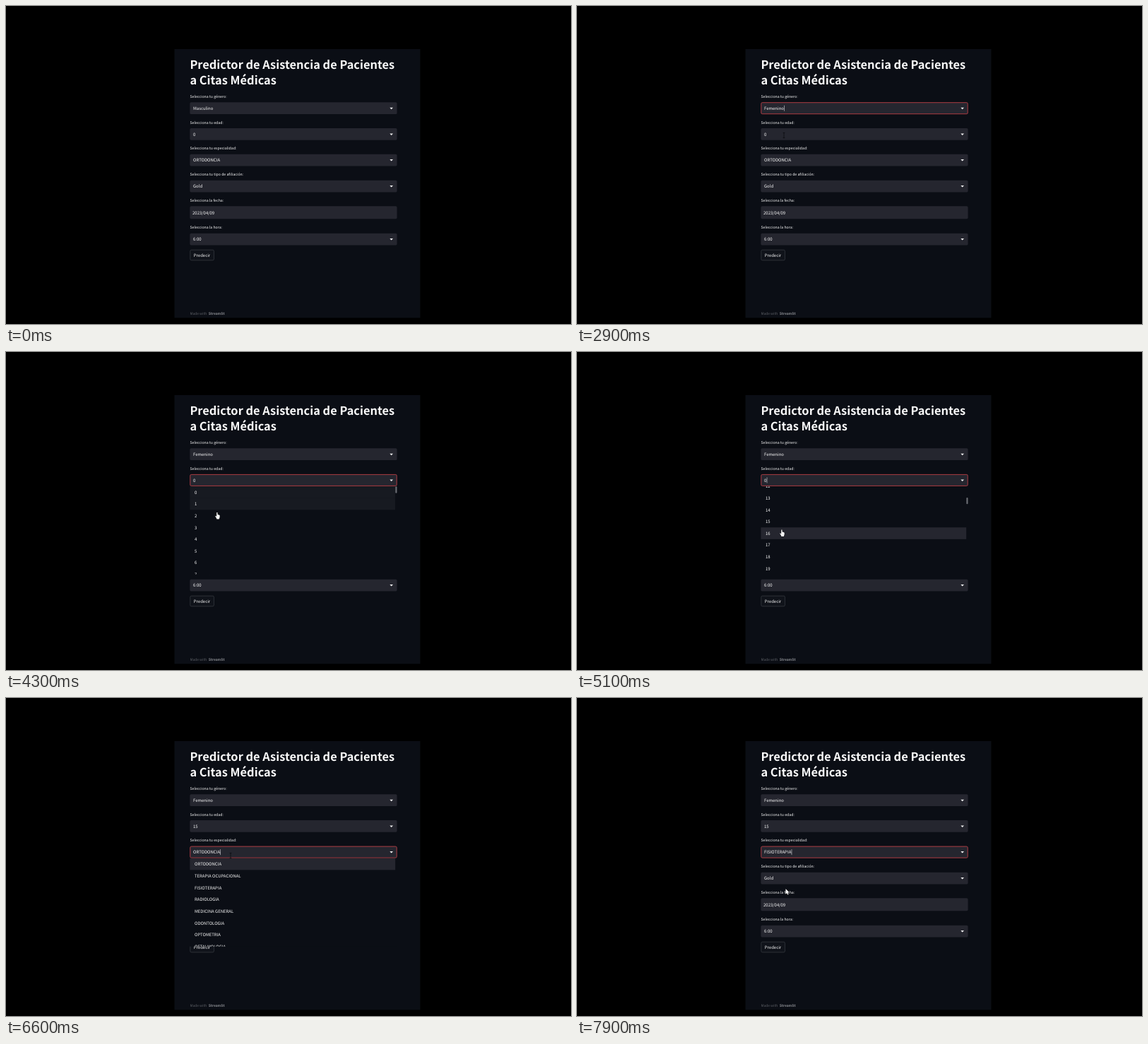
Animation, 800 px wide and 450 px high, one loop 8 s. Source, as an HTML page with a canvas:

```html
<!DOCTYPE html>
<html lang="es">
<head>
<meta charset="utf-8">
<title>Predictor de Asistencia</title>
<style>
html, body { margin: 0; width: 100%; height: 100%; overflow: hidden; background: #000; }
canvas { display: block; width: 800px; height: 450px; }
</style>
</head>
<body>
<canvas id="stage"></canvas>
<script>
const LOOP = 8000, STEP = 100;
const LEFT = 260.4, RIGHT = 553.6, ROW = 16.64;
const PANEL = '#0b0e15', FIELD = '#25262f', TEXT = '#fafafa', FOCUS = '#b93d43';
const FAMILY = '"Noto Sans CJK JP", "Noto Sans CJK SC", "Noto Sans CJK KR", "Noto Sans CJK", "Noto Sans", sans-serif';

const canvas = document.getElementById('stage');
const ctx = canvas.getContext('2d');
const dpr = window.devicePixelRatio || 1;
canvas.width = 800 * dpr;
canvas.height = 450 * dpr;

const ages = Array.from({ length: 100 }, (_, i) => String(i));
const specialties = ['ORTODONCIA', 'TERAPIA OCUPACIONAL', 'FISIOTERAPIA', 'RADIOLOGIA',
  'MEDICINA GENERAL', 'ODONTOLOGIA', 'OPTOMETRIA', 'OFTALMOLOGIA'];

const lists = [
  { items: ['Masculino', 'Femenino'], top: 153, bottom: 186.4, open: 1700, close: 2400 },
  { items: ages, top: 190, bottom: 315, open: 3800, close: 5700, bar: true },
  { items: specialties, top: 226.7, bottom: 351.8, open: 6200, close: 7600 }
];

// label, label centre, field centre, field height, value at time t
const fields = [
  ['Selecciona tu género:', 127.6, 144.7, 16.8, t => t < 2400 ? 'Masculino' : 'Femenino'],
  ['Selecciona tu edad:', 164.6, 181.4, 16.8, t => t < 5700 ? '0' : '15'],
  ['Selecciona tu especialidad:', 201.4, 218.1, 16.8, t => t < 7600 ? 'ORTODONCIA' : 'FISIOTERAPIA'],
  ['Selecciona tu tipo de afiliación:', 238.4, 255.1, 16.8, () => 'Gold'],
  ['Selecciona la fecha:', 275.2, 292.3, 18, () => '2023/04/09'],
  ['Selecciona la hora:', 313.4, 330.1, 16.8, () => '6:00']
];

// pointer path: time, x, y of the hot spot
const path = [
  [300, 430, 306], [1100, 538, 147], [1500, 541, 147], [2000, 541, 147], [2300, 294, 178],
  [2600, 293, 183], [4100, 293, 183], [4200, 298, 209], [4300, 299, 227], [4500, 296, 245],
  [4800, 290, 251.5], [5300, 290, 251.5], [5600, 290, 239], [5800, 292, 236], [6100, 318, 223],
  [6800, 318, 223], [7300, 296, 266], [7600, 296, 267], [7800, 295.5, 270], [8000, 295.5, 270]
];

const clamp = v => Math.max(0, Math.min(1, v));
const smooth = v => v * v * (3 - 2 * v);

function pointer(t) {
  let i = 1;
  while (i < path.length - 1 && t > path[i][0]) i++;
  const [t0, x0, y0] = path[i - 1], [t1, x1, y1] = path[i];
  const k = clamp((t - t0) / (t1 - t0));
  return { x: x0 + (x1 - x0) * k, y: y0 + (y1 - y0) * k };
}

// five wheel notches
const scrollAt = t => 5 * 41.6 * smooth(clamp((t - 4400) / 400));

function text(str, x, middle, size, weight = 400, color = TEXT) {
  ctx.font = `${weight} ${size}px ${FAMILY}`;
  ctx.textRendering = 'geometricPrecision';
  ctx.fillStyle = color;
  ctx.fillText(str, x, middle + size * 0.385);
  return x + ctx.measureText(str).width;
}

function box(x, y, w, h, fill, stroke, line = 0.9) {
  ctx.beginPath();
  ctx.roundRect(x, y, w, h, 1.7);
  if (fill) { ctx.fillStyle = fill; ctx.fill(); }
  if (stroke) { ctx.strokeStyle = stroke; ctx.lineWidth = line; ctx.stroke(); }
}

function shape(points, fill, stroke, line = 0.6) {
  ctx.beginPath();
  points.forEach(([x, y]) => ctx.lineTo(x, y));
  ctx.closePath();
  if (stroke) { ctx.strokeStyle = stroke; ctx.lineWidth = line; ctx.stroke(); }
  ctx.fillStyle = fill;
  ctx.fill();
}

function focusIndex(t) {
  for (let i = lists.length - 1; i >= 0; i--) if (t >= lists[i].open) return i;
  return -1;
}

function caretOn(t) {
  return !(t >= 3400 && t < 3800) && !(t >= 4200 && t < 4800) && !(t >= 5300 && t < 5700) &&
    !(t >= 7100 && t < 7600);
}

function drawField([label, labelY, y, h, value], i, t) {
  const focused = focusIndex(t) === i;
  const isDate = i === 4;
  text(label, LEFT, labelY, 5.22);
  box(LEFT, y - h / 2, RIGHT - LEFT, h, FIELD);
  if (focused) box(LEFT + 0.4, y - h / 2 + 0.4, RIGHT - LEFT - 0.8, h - 0.8, null, FOCUS);
  const end = text(value(t), isDate ? 264 : 265, y, 5.97);
  if (focused && caretOn(t)) {
    ctx.fillStyle = '#d8d8dc';
    ctx.fillRect(end + 0.4, y - 4, 0.6, 8);
  }
  if (!isDate) shape([[543.4, y - 1], [548, y - 1], [545.7, y + 1.5]], TEXT);
}

function hoverRow(list, t) {
  const p = pointer(t);
  if (p.y < list.top || t < list.open) return 0;
  const scroll = list.bar ? scrollAt(t) : 0;
  return Math.floor((p.y - list.top + scroll) / ROW);
}

function drawList(list, t) {
  const { items, top, bottom, bar } = list;
  const scroll = bar ? scrollAt(t) : 0;
  const right = items.length > 2 ? 551.2 : RIGHT;
  ctx.save();
  ctx.beginPath();
  ctx.rect(LEFT - 0.4, top, RIGHT - LEFT + 0.8, bottom - top);
  ctx.clip();
  ctx.fillStyle = PANEL;
  ctx.fillRect(LEFT - 0.4, top, RIGHT - LEFT + 0.8, bottom - top);

  // the highlight trails the pointer and fades between rows
  const weight = {};
  for (const lag of [60, 85, 110, 135]) {
    const row = hoverRow(list, t - lag);
    weight[row] = (weight[row] || 0) + 0.25;
  }
  for (const row in weight) {
    ctx.globalAlpha = weight[row];
    ctx.fillStyle = FIELD;
    ctx.fillRect(LEFT, top + row * ROW - scroll, right - LEFT, ROW);
  }
  ctx.globalAlpha = 1;

  items.forEach((item, i) => {
    const y = top + (i + 0.5) * ROW - scroll;
    if (y > top - ROW && y < bottom + ROW) text(item, 267, y, 5.97);
  });
  if (bar) {
    const ratio = (bottom - top) / (items.length * ROW);
    box(551.4, top + 0.3 + scroll * ratio, 2.1, 9.4, '#6e7077');
  }
  ctx.restore();
}

function drawHand(x, y) {
  const at = pts => pts.map(([dx, dy]) => [x + dx, y + dy]);
  shape(at([[-0.8, 0], [0.5, 0], [0.7, 3], [2.8, 3.6], [3.8, 4.5], [3.6, 7], [2.8, 9.4],
    [-0.6, 9.4], [-1.4, 7.6], [-2.9, 5.6], [-2.3, 4.8], [-0.9, 5.8]]), '#f4f4f4', '#000');
}

function drawBeam(x, y) {
  ctx.strokeStyle = '#08090c';
  ctx.lineWidth = 0.7;
  ctx.beginPath();
  ctx.moveTo(x - 1.4, y - 3.6); ctx.lineTo(x + 1.4, y - 3.6);
  ctx.moveTo(x, y - 3.6); ctx.lineTo(x, y + 3.6);
  ctx.moveTo(x - 1.4, y + 3.6); ctx.lineTo(x + 1.4, y + 3.6);
  ctx.stroke();
}

function drawArrow(x, y) {
  const at = pts => pts.map(([dx, dy]) => [x + dx, y + dy]);
  shape(at([[0, 0], [0, 7.4], [1.7, 5.9], [2.8, 8.4], [4, 7.9], [2.9, 5.4], [5.1, 5.2]]), '#fff', '#000');
}

function drawPointer(t, list) {
  if (t < 300) return;
  const { x, y } = pointer(t);
  const inList = list && y >= list.top && y < list.bottom;
  const inField = fields.some(([, , fy, h]) => Math.abs(y - fy) < h / 2);
  const justPicked = t >= 2400 && t < 2600 || t === 7600;
  if (inList || justPicked) drawHand(x, y);
  else if (inField) drawBeam(x, y);
  else drawArrow(x, y);
}

function draw(t) {
  ctx.setTransform(dpr, 0, 0, dpr, 0, 0);
  ctx.fillStyle = '#000';
  ctx.fillRect(0, 0, 800, 450);
  ctx.fillStyle = PANEL;
  ctx.fillRect(238.5, 61, 348, 380.3);

  text('Predictor de Asistencia de Pacientes', LEFT, 83, 16.4, 700);
  text('a Citas Médicas', LEFT, 105, 16.4, 700);
  fields.forEach((field, i) => drawField(field, i, t));

  box(260.8, 345.2, 33.6, 14.6, '#10131a', '#3c3f46', 0.7);
  text('Predecir', 265.8, 352.5, 5.97);
  text('Made with', LEFT, 434.8, 4.95, 400, '#5c5f65');
  text('Streamlit', 286.8, 434.8, 4.95, 700, '#8a8c91');

  const list = lists.find(l => t >= l.open && t < l.close);
  if (list) drawList(list, t);
  drawPointer(t, list);
}

function tick(now) {
  draw(Math.floor((now % LOOP) / STEP) * STEP);
  requestAnimationFrame(tick);
}
requestAnimationFrame(tick);
</script>
</body>
</html>
```
